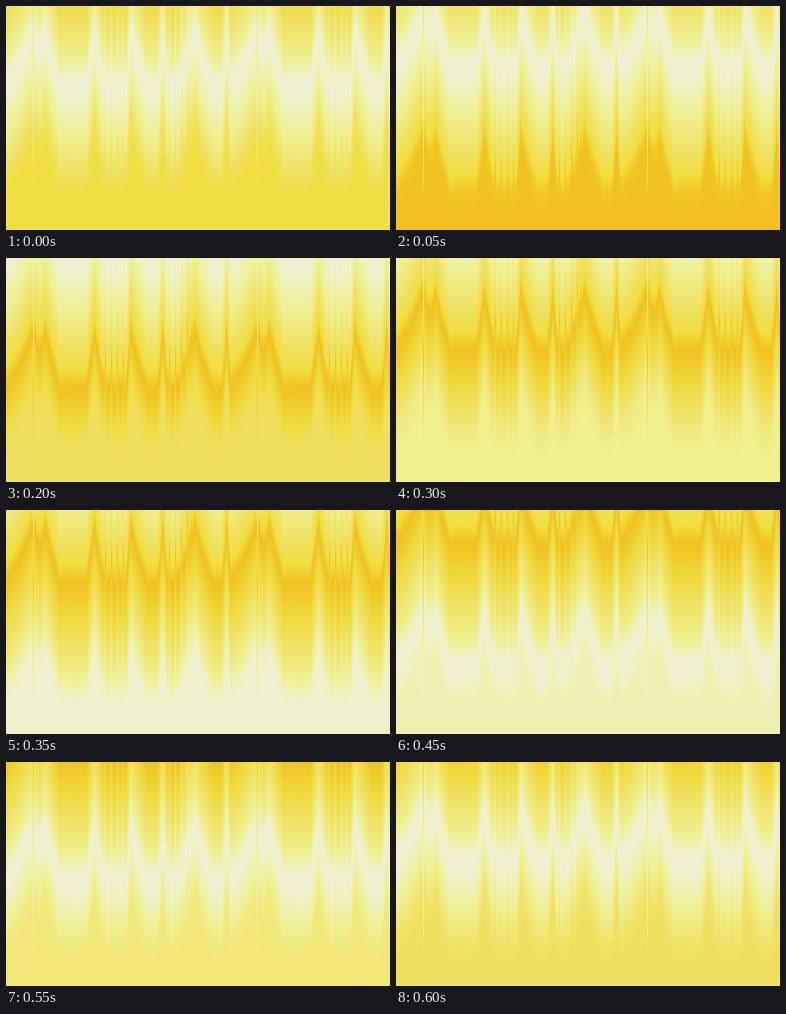
Animation of 384 by 224 pixels, one loop 0.65 s. Source, as an HTML page with a canvas:

```html
<!DOCTYPE html>
<html lang="en">
<head>
<meta charset="utf-8">
<title>Golden flames</title>
<style>
html, body { margin: 0; width: 100%; height: 100%; overflow: hidden; background: #f0e040; }
canvas { display: block; width: 384px; height: 224px; }
</style>
</head>
<body>
<canvas id="stage" width="384" height="224"></canvas>
<script>
const W = 384, H = 224, PERIOD = 224;
const STEPS = 13, STEP_MS = 50;
const VALLEY = 188, RELIEF = 58, RISE = 19.2;

// green and blue at key steps of the colour cycle; red is always 240
const keys = [
  { at: 0, g: 224, b: 64 },
  { at: 1, g: 192, b: 32 },
  { at: 3, g: 220, b: 64 },
  { at: 4, g: 224, b: 96 },
  { at: 6, g: 240, b: 144 },
  { at: 7, g: 240, b: 208 },
  { at: 8, g: 240, b: 208 },
  { at: 10, g: 240, b: 144 },
  { at: 12, g: 224, b: 96 },
  { at: 13, g: 224, b: 64 }
];

// peaks of the lower edge, with the reach of each flank
const peaks = [
  { x: 27, left: 30, right: 20 },
  { x: 39, left: 18, right: 15 },
  { x: 88, left: 9, right: 11 },
  { x: 124, left: 5, right: 18 },
  { x: 156, left: 5, right: 6 },
  { x: 188, left: 20, right: 20 },
  { x: 220, left: 5, right: 5 }
];

const lerp = (a, b, t) => a + (b - a) * t;

function colorAt(step) {
  const i = keys.findIndex(key => key.at > step);
  const from = keys[i - 1], to = keys[i];
  const t = (step - from.at) / (to.at - from.at);
  return [240, lerp(from.g, to.g, t), lerp(from.b, to.b, t)];
}

function flank(x, peak) {
  const d = (x - peak.x + PERIOD * 1.5) % PERIOD - PERIOD / 2;
  const reach = d < 0 ? peak.left : peak.right;
  return Math.max(0, 1 - Math.abs(d) / reach) ** 1.3;
}

function jitter(x) {
  const s = Math.sin(x * 12.9898) * 43758.5453;
  return (s - Math.floor(s) - 0.5) * 6;
}

const heights = Array.from({ length: PERIOD }, (_, x) =>
  VALLEY - RELIEF * Math.max(...peaks.map(peak => flank(x, peak))) + jitter(x));

// two groups of evenly spaced streaks and one dark slit
for (const first of [99, 163])
  for (let x = first; x < first + 20; x += 6) heights[x] -= 28;
heights[27] = VALLEY;

// age of the colour in steps, with a soft start at the lower edge
function ageAt(x, y) {
  const u = (heights[x % PERIOD] - y) / RISE;
  return 0.3 * Math.log(1 + Math.exp(u / 0.3));
}

const ages = new Float32Array(W * H);
for (let y = 0; y < H; y++)
  for (let x = 0; x < W; x++) ages[y * W + x] = ageAt(x, y);

const SHADES = 32;
const ramp = Array.from({ length: STEPS * SHADES }, (_, i) => colorAt(i / SHADES));

function paint(step) {
  const image = new ImageData(W, H);
  ages.forEach((age, i) => {
    const t = (step - age + STEPS) % STEPS;
    image.data.set([...ramp[Math.floor(t * SHADES)], 255], i * 4);
  });
  return image;
}

const ctx = document.getElementById("stage").getContext("2d");
const images = Array.from({ length: STEPS }, (_, step) => paint(step));
const start = performance.now();
let shown = -1;

function draw() {
  const elapsed = Math.max(0, performance.now() - start);
  const step = Math.floor(elapsed / STEP_MS) % STEPS;
  if (step !== shown) ctx.putImageData(images[step], 0, 0);
  shown = step;
  requestAnimationFrame(draw);
}
draw();
</script>
</body>
</html>
```
